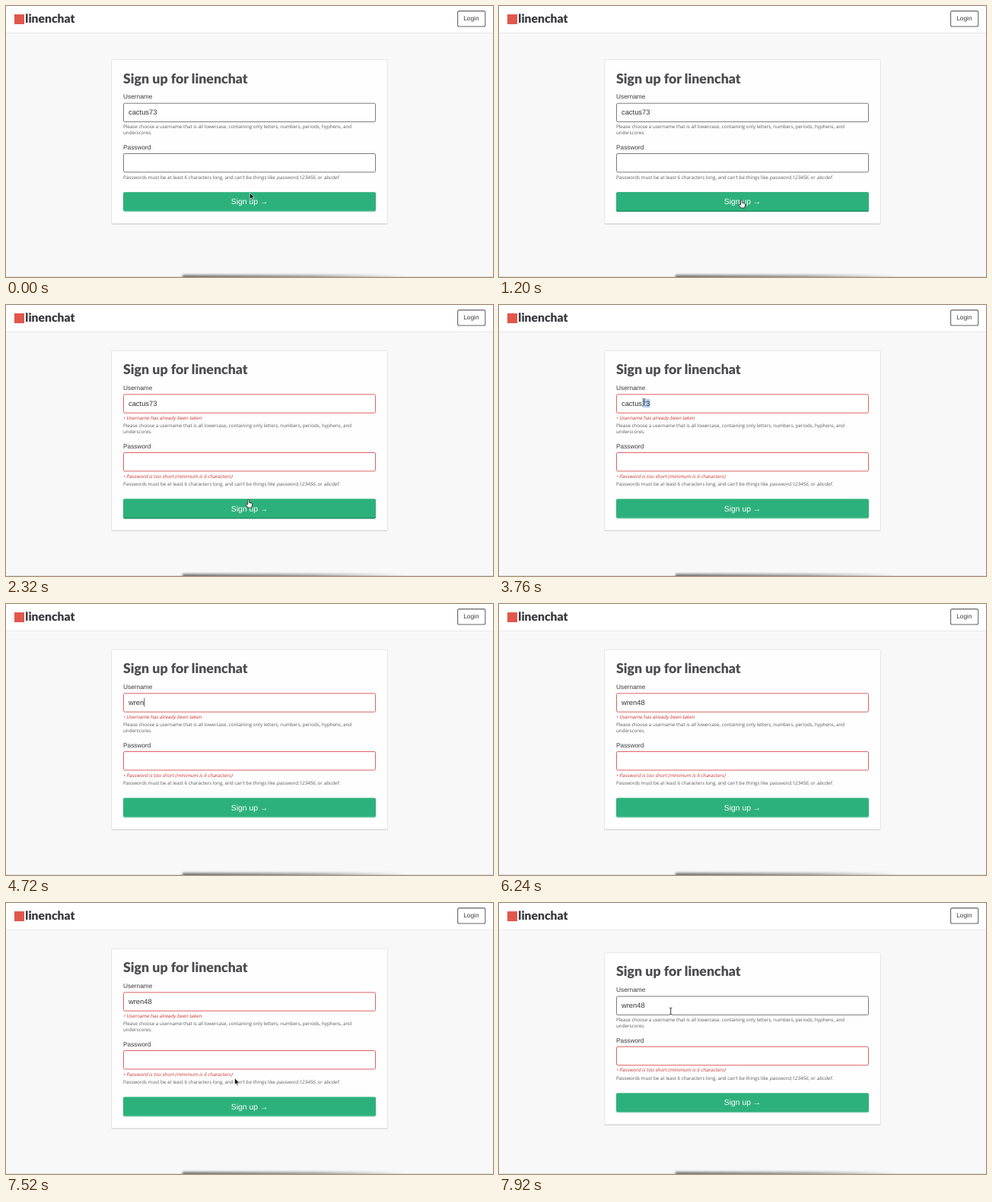
These frames come from a looping animation (640x357 px, 8 s). An HTML page:

```html
<!DOCTYPE html>
<html lang="en">
<head>
<meta charset="utf-8">
<title>Sign up</title>
<style>
html, body { margin: 0; width: 100%; height: 100%; overflow: hidden; background: #f8f8f8; }
svg { display: block; width: 100%; height: 100%; }
text { white-space: pre; text-rendering: geometricPrecision; }
.logo { font: 900 15.7px Lato, sans-serif; fill: #38383d; }
.title { font: 900 17.75px Lato, sans-serif; fill: #4d4d50; }
.label { font: 8.32px "Liberation Sans", sans-serif; fill: #3a3a3d; }
.value { font: 9.36px "Liberation Sans", sans-serif; fill: #333336; }
.btn { font: 10.4px "Liberation Sans", sans-serif; fill: #fff; }
.help { font: 6.24px "Open Sans", sans-serif; fill: #5a5a5e; }
.error { font: 6.24px "Open Sans", sans-serif; fill: #cc2f2f; }
.field { fill: #fff; }
</style>
</head>
<body>
<svg viewBox="0 0 640 357" preserveAspectRatio="none">
  <defs>
    <linearGradient id="fade">
      <stop offset="0" stop-color="#000" stop-opacity=".5"/>
      <stop offset=".6" stop-color="#000" stop-opacity=".3"/>
      <stop offset="1" stop-color="#000" stop-opacity="0"/>
    </linearGradient>
  </defs>
  <rect width="640" height="357" fill="#f8f8f8"/>
  <rect width="640" height="35" fill="#fff"/>
  <rect y="35" width="640" height="1" fill="#e9e9e9"/>
  <rect x="11" y="11" width="13" height="13" fill="#e2574c"/>
  <rect x="593.6" y="6.6" width="36.2" height="20.4" rx="2" fill="#fff" stroke="#66666a" stroke-width="1.1"/>
  <g id="head"></g>
  <rect x="232" y="354" width="290" height="6" fill="url(#fade)" style="filter:blur(1.8px)"/>
  <rect y="356" width="640" height="1" fill="#000" opacity=".1"/>

  <rect id="shade" x="138.5" width="363" rx="2" fill="#cfcfcf"/>
  <rect id="card" x="138.5" width="363" rx="2" fill="#fefefe" stroke="#e6e6e6"/>
  <g id="top">
    <rect id="userBox" class="field" x="154.5" y="128.2" width="331" height="24.4" rx="1.6"/>
    <rect id="mark" y="134.2" height="11.2" fill="#aed0f2"/>
    <rect id="caret" y="134.4" width=".8" height="11" fill="#333"/>
  </g>
  <g id="mid">
    <rect id="passBox" class="field" x="154.5" y="194.5" width="331" height="24.4" rx="1.6"/>
  </g>
  <g id="low">
    <rect x="154" y="245.4" width="332" height="25.6" rx="2" fill="#75cba8"/>
    <rect id="edge" x="154" y="245.4" width="332" height="25.6" rx="2" fill="#1f8a5d"/>
    <rect id="face" x="154" y="245.2" width="332" height="24.6" rx="2"/>
  </g>
  <g id="cursor">
    <path id="arrow" d="M0 0V8.6L2 6.8L3.3 9.8L4.6 9.2L3.4 6.3H6Z" fill="#111" stroke="#fff" stroke-width=".6"/>
    <path id="hand" d="M-1 1Q0-.4 1 1V4.4L4.6 5.2Q5.2 5.6 5 7L4 11H-.8L-3.4 7.4Q-3.4 6-2 6.4L-1 7.2Z" fill="#fff" stroke="#222" stroke-width=".85" stroke-linejoin="round"/>
    <g id="beam" fill="none">
      <path d="M-1.8-4.4Q0-4.4 0-3.4Q0-4.4 1.8-4.4M0-3.4V3.4M-1.8 4.4Q0 4.4 0 3.4Q0 4.4 1.8 4.4" stroke="#fff" stroke-width="1.8"/>
      <path d="M-1.8-4.4Q0-4.4 0-3.4Q0-4.4 1.8-4.4M0-3.4V3.4M-1.8 4.4Q0 4.4 0 3.4Q0 4.4 1.8 4.4" stroke="#222" stroke-width=".9"/>
    </g>
  </g>
</svg>
<script>
const LOOP = 8000, STEP = 80, LEFT = 154, TEXT_X = 161, ERROR_H = 10.4;
const BRAND = 'linenchat', FIRST = 'cactus73', SECOND = 'wren48';
const KEY_TIMES = [4240, 4400, 4560, 4720, 5520, 5840];
const FAIL_BOTH = 2320, FAIL_PASS = 7680;

const $ = id => document.getElementById(id);
const set = (el, attrs) => { for (const k in attrs) el.setAttribute(k, attrs[k]); };
const show = (el, on) => { el.style.display = on ? '' : 'none'; };
const shift = (el, y) => set(el, { transform: `translate(0 ${y})` });
const within = (t, a, b) => t >= a && t < b;
const clamp = v => Math.max(0, Math.min(1, v));

function write(parent, cls, x, y, str, slant) {
  const el = document.createElementNS('http://www.w3.org/2000/svg', 'text');
  el.textContent = str;
  set(el, { class: cls, transform: `translate(${x} ${y})${slant ? ' skewX(-14)' : ''}` });
  parent.appendChild(el);
  return el;
}

const head = $('head'), top_ = $('top'), mid = $('mid'), low = $('low');
write(head, 'logo', 25.3, 21.6, BRAND);
write(head, 'label', 601.2, 19.4, 'Login');
write(top_, 'title', LEFT, 101.6, 'Sign up for ' + BRAND);
write(top_, 'label', LEFT, 122.2, 'Username');
const value = write(top_, 'value', TEXT_X, 143.2, FIRST);
const userError = write(top_, 'error', LEFT, 161, '• Username has already been taken', true);
write(mid, 'help', LEFT, 161, 'Please choose a username that is all lowercase, containing only letters, numbers, periods, hyphens, and');
write(mid, 'help', LEFT, 169.3, 'underscores.');
write(mid, 'label', LEFT, 188.7, 'Password');
const passError = write(mid, 'error', LEFT, 227.6, '• Password is too short (minimum is 6 characters)', true);

// Every second piece is slanted.
let penX = LEFT;
['Passwords must be at least 6 characters long, and can\'t be things like ',
 'password', ',', '123456', ', or ', 'abcdef', '.'].forEach((part, i) => {
  penX += write(low, 'help', penX, 227.6, part, i % 2).getComputedTextLength();
});
set(write(low, 'btn', 320, 261.2, 'Sign up →'), { 'text-anchor': 'middle' });

// time, x, y of the pointer's hot spot
const PATH = [
  [0, 320.3, 246], [240, 323, 252], [560, 325, 256], [960, 324, 256], [1200, 318.7, 255],
  [1440, 318.7, 256], [2560, 318.7, 256], [2800, 262, 190], [3040, 222, 131],
  [3200, 222, 131], [3600, 199, 128.5], [3760, 190.5, 128], [4080, 119, 127],
  [6240, 119, 127], [6480, 180, 172], [6800, 305, 252], [7040, 331.7, 268],
  [7360, 331.7, 268], [7600, 285, 212], [7920, 225.7, 142.5], [8000, 225.7, 142.5]
];

function pointer(t) {
  let i = 0;
  while (i < PATH.length - 2 && PATH[i + 1][0] <= t) i++;
  const [t0, x0, y0] = PATH[i], [t1, x1, y1] = PATH[i + 1];
  const k = clamp((t - t0) / (t1 - t0));
  return [x0 + (x1 - x0) * k, y0 + (y1 - y0) * k];
}

function pointerKind(t, x, y, userY, passY, btnY) {
  if (t < 120) return 'arrow';
  if (within(t, 3600, 4240)) return 'beam';
  if (x < LEFT || x > 486) return 'arrow';
  if (within(y, btnY, btnY + 26)) return 'hand';
  return [userY, passY].some(v => within(y, v, v + 25)) ? 'beam' : 'arrow';
}

function typed(t) {
  const n = KEY_TIMES.filter(k => k <= t).length;
  return n ? SECOND.slice(0, n) : FIRST;
}

const widthTo = n => n ? value.getSubStringLength(0, n) : 0;

function draw(t) {
  const e1 = within(t, FAIL_BOTH, FAIL_PASS), e2 = t >= FAIL_BOTH;
  const extra = (e1 + e2) * ERROR_H;
  const topY = -extra / 2, midY = topY + e1 * ERROR_H, lowY = midY + e2 * ERROR_H;
  shift(top_, topY);
  shift(mid, midY);
  shift(low, lowY);
  set($('card'), { y: 70.5 + topY, height: 216 + extra });
  set($('shade'), { y: 71.5 + topY, height: 216.2 + extra });
  show(userError, e1);
  show(passError, e2);
  set($('userBox'), { stroke: e1 ? '#df6262' : '#7b7b7f' });
  set($('passBox'), { stroke: e2 ? '#df6262' : '#7b7b7f' });

  const str = typed(t);
  if (value.textContent !== str) value.textContent = str;
  const [x, y] = pointer(t);

  // Dragging left selects back to the nearest letter gap.
  const selecting = within(t, 3600, KEY_TIMES[0]);
  show($('mark'), selecting);
  if (selecting) {
    let from = str.length;
    const gap = n => Math.abs(TEXT_X + widthTo(n) - x);
    while (from && gap(from - 1) < gap(from)) from--;
    const a = widthTo(from);
    set($('mark'), { x: TEXT_X + a, width: widthTo(str.length) - a });
  }

  const caretOn = [[360, 860], [1360, 1840], [4240, 5200], [5520, 6240]]
    .some(([a, b]) => within(t, a, b));
  show($('caret'), caretOn);
  if (caretOn) set($('caret'), { x: TEXT_X + widthTo(str.length) + .2 });

  const hover = t < 3280 ? clamp((t - 80) / 160) : within(t, 6800, 7520) ? clamp((t - 6800) / 160) : 0;
  const pressed = within(t, 1840, 2000) || within(t, 7200, 7280);
  $('edge').style.opacity = t < 3280 || t >= 6800 ? hover : 0;
  set($('face'), { fill: pressed ? '#28a874' : '#2db17c' });

  show($('cursor'), !within(t, KEY_TIMES[0], 6320));
  set($('cursor'), { transform: `translate(${x} ${y})` });
  const kind = pointerKind(t, x, y, 128 + topY, 194 + midY, 245 + lowY);
  for (const id of ['arrow', 'hand', 'beam']) show($(id), id === kind);
}

const start = performance.now();
function tick() {
  const t = (performance.now() - start) % LOOP;
  draw(Math.floor(t / STEP) * STEP);
  requestAnimationFrame(tick);
}
tick();
</script>
</body>
</html>
```
